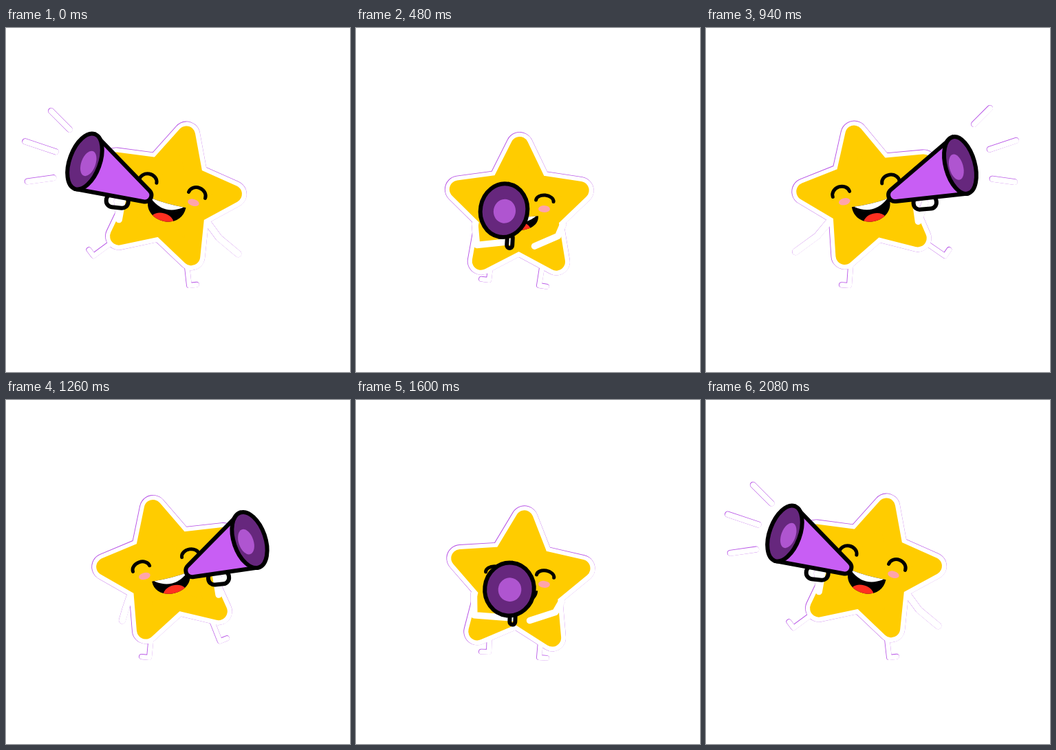
An HTML page with a canvas for the animation above (2120 ms loop, 500 px wide and 500 px high).

```html
<!DOCTYPE html>
<html lang="en">
<head>
<meta charset="utf-8">
<title>Star with megaphone</title>
<style>
  html, body { margin: 0; width: 100%; height: 100%; overflow: hidden; background: #fff; }
  canvas { display: block; width: 100vw; height: 100vh; }
</style>
</head>
<body>
<canvas id="stage" width="500" height="500"></canvas>
<script>
const ctx = document.getElementById('stage').getContext('2d');
const HALF = 1060, LOOP = 2 * HALF, STEP = 20, CX = 237, RAD = Math.PI / 180;
const YELLOW = '#ffcc00', FRINGE = '#b650e6', DARK = '#66277d', LIGHT = '#af55d0', BODY = '#c85ef4';
const SIDES = [-1, 1];

// y: height of the star, turn: its lean, bx and by: bell seen from the star, kick: lifted foot
const shout = { y: 245, turn: 15.7, bx: -122.5, by: -51, kick: 1 };
const lower = { y: 252, turn: 14, bx: -95.5, by: -39, kick: 0 };
const front = { y: 266, turn: 4.8, bx: -14, by: 9, kick: 0 };
const turn = { y: 252.6, turn: -8.6, bx: 75, by: -23.6, kick: .4 };
const reach = { y: 245, turn: -13.5, bx: 132.5, by: -45.5, kick: 1 };
const settle = { y: 248, turn: -14.5, bx: 117, by: -44.5, kick: .45 };

const mirror = p => ({ ...p, turn: -p.turn, bx: -p.bx });
const clamp = v => Math.max(0, Math.min(1, v));
const mix = (a, b, u) => [a[0] + (b[0] - a[0]) * u, a[1] + (b[1] - a[1]) * u];

// Swing from left to right; the way back is its mirror image
const keys = [
  [0, shout], [200, mirror(settle)], [320, lower], [540, mirror(front)],
  [620, turn], [780, reach], [940, reach], [1020, mirror(shout)]
];

function keyAt(i) {
  const n = keys.length, lap = Math.floor(i / n), [t, p] = keys[i - lap * n];
  return { t: t + lap * HALF, p: lap % 2 ? mirror(p) : p };
}

// Smooth interpolation that never overshoots a key
function poseAt(time) {
  const t = time % HALF, pose = {};
  let i = keys.length - 1;
  while (keys[i][0] > t) i--;
  const [a, b, c, d] = [i - 1, i, i + 1, i + 2].map(keyAt);
  const h = c.t - b.t, u = (t - b.t) / h;
  const slope = (x, y) => x * y > 0 ? 2 * x * y / (x + y) : 0;
  for (const k in b.p) {
    const v = b.p[k], e = c.p[k] - v;
    const m0 = slope((v - a.p[k]) / (b.t - a.t), e / h) * h;
    const m1 = slope(e / h, (d.p[k] - c.p[k]) / (d.t - c.t)) * h;
    pose[k] = v + u * (m0 + u * (3 * e - 2 * m0 - m1 + u * (m0 + m1 - 2 * e)));
  }
  return time >= HALF ? mirror(pose) : pose;
}

function line(pts, closed) {
  const path = new Path2D();
  pts.forEach(p => path.lineTo(...p));
  if (closed) path.closePath();
  return path;
}

function stroke(path, width, color) {
  ctx.lineWidth = width;
  ctx.strokeStyle = color;
  ctx.stroke(path);
}

function fill(path, color) {
  ctx.fillStyle = color;
  ctx.fill(path);
}

function oval(x, y, rx, ry, tilt = 0, from = 0, to = 2 * Math.PI) {
  const path = new Path2D();
  path.ellipse(x, y, rx, ry, tilt, from, to);
  return path;
}

// Maps a point of the star's own frame onto the stage
function placer(p) {
  const c = Math.cos(p.turn * RAD), s = Math.sin(p.turn * RAD);
  return (x, y) => [CX + x * c - y * s, p.y + x * s + y * c];
}

function starPath(at) {
  const pts = [];
  for (let i = 0; i < 10; i++) {
    const a = (i * 36 - 90) * RAD, r = i % 2 ? 46.4 : 93;
    pts.push(at(r * Math.cos(a), r * Math.sin(a)));
  }
  return line(pts, true);
}

// The cone shortens and its bell opens as it swings towards the viewer
function hornAt(p, at) {
  const bell = [CX + p.bx, p.y + p.by];
  const tipX = .28 * p.bx, tip = at(tipX, 22 - .42 * Math.abs(tipX));
  const dx = tip[0] - bell[0], dy = tip[1] - bell[1];
  const len = Math.hypot(dx, dy), full = Math.min(1, len / 95);
  const depth = 38 - .16 * len;
  const slope = Math.atan2(dy, Math.abs(dx)) - 9 * RAD;
  const [gx, gy] = mix(bell, tip, .54);
  return {
    bell, tip, depth, tall: 48.5 - .28 * depth,
    axis: Math.atan2(dy, dx), tilt: Math.sign(dx) * slope * full,
    grip: [gx, gy + 37 - 6 * full], gripW: Math.max(4, .16 * len)
  };
}

function armPath(p, at, side, hold, grip) {
  const out = 15 + .36 * Math.abs(p.bx) + 60 * p.kick;
  const elbow = mix(at(side * (50 + .3 * out), 38), at(side * 61, 52), hold);
  return line([at(side * 64, 21), elbow, mix(at(side * out, 53), grip, hold)]);
}

function legPath(p, at, side, near) {
  const kick = p.kick * near, hip = at(side * 38, 55);
  const x = CX + side * (29 + 15 * near + 66 * kick), y = 374 - 8 * near - 35 * kick;
  const dx = x - hip[0], dy = y - hip[1], k = 11 * side / Math.hypot(dx, dy);
  return line([hip, [x, y], [x + dy * k, y - dx * k]]);
}

// Three rays fan out from a point inside the megaphone
function rayPaths(t) {
  const right = t >= 820 && t < 1100;
  const late = t < STEP ? t + LOOP : t;
  if (!right && late < 1880) return [];
  const age = late - (right ? 820 : 1880);
  const shift = right ? age * .15 - 11 : age * .1 - 24;
  const flip = right ? -1 : 1;
  return [0, 1, 2].map(i => {
    const a = (225 - 26.5 * i) * RAD, len = (i === 1 ? 47 : 38) * (right ? .86 : 1);
    const tail = 83 + shift + (right ? 4 : 0);
    return line([tail, tail + len * clamp(age / 100)].map(r =>
      [CX + flip * (r * Math.cos(a) - 86), 206 + r * Math.sin(a)]));
  });
}

function drawFace(p) {
  const open = Math.max(.8, 1 - .03 * (p.y - 245)), depth = 46 * open;
  ctx.save();
  ctx.translate(CX, p.y);
  ctx.rotate(p.turn * RAD);
  for (const side of SIDES) {
    const eye = oval(37 * side - .012 * p.bx, -13, 12.8, 25 - 14 * (2 - open),
      5 * side * RAD, Math.PI, 2 * Math.PI);
    stroke(eye, 5, '#000');
    fill(oval(36.5 * side, -1.2, 8.5, 5), '#ffa4ab');
  }
  const mouth = new Path2D(`M-28 9Q0 12 28 9C30 ${depth} -30 ${depth} -28 9Z`);
  fill(mouth, '#000');
  ctx.clip(mouth);
  fill(oval(0, 37 * open, 17, 11.5), '#ff3020');
  fill(new Path2D('M-25 6L25 6L24 10Q0 28 -24 10Z'), '#fff');
  ctx.restore();
}

function drawHorn({ bell, tip, depth, tall, axis, tilt, grip, gripW }) {
  ctx.save();
  ctx.translate(...grip);
  ctx.rotate(tilt * .3);
  const handle = new Path2D();
  handle.roundRect(-gripW, -9.5, 2 * gripW, 19, Math.min(gripW, 9));
  stroke(handle, 6, '#000');
  ctx.restore();

  const ex = Math.sin(tilt) * tall, ey = -Math.cos(tilt) * tall;
  // Pick the bell end that lies on the same side as the start of the tip arc
  const side = Math.sin(axis) * ex - Math.cos(axis) * ey > 0 ? 1 : -1;
  const cone = new Path2D();
  cone.moveTo(bell[0] + ex * side, bell[1] + ey * side);
  cone.arc(...tip, 9.5, axis - 1.3, axis + 1.3);
  cone.lineTo(bell[0] - ex * side, bell[1] - ey * side);
  cone.closePath();
  fill(cone, BODY);
  stroke(cone, 6, '#000');

  const rim = oval(...bell, depth, tall, tilt);
  fill(rim, DARK);
  stroke(rim, 6, '#000');
  fill(oval(...mix(bell, tip, .06), depth * .47, tall * .45, tilt), LIGHT);
}

function draw(t) {
  const p = poseAt(t), at = placer(p), star = starPath(at), horn = hornAt(p, at);
  const near = SIDES.map(side => clamp(.5 + side * p.bx / 28));
  const arms = SIDES.map((side, i) => armPath(p, at, side, near[i], horn.grip));
  const soft = [
    [star, 39],
    ...SIDES.map((side, i) => [legPath(p, at, side, near[i]), 7]),
    ...arms.map(arm => [arm, 9]),
    ...rayPaths(t).map(ray => [ray, 8])
  ];

  ctx.fillStyle = '#fff';
  ctx.fillRect(0, 0, 500, 500);
  ctx.lineCap = ctx.lineJoin = 'round';
  for (const [path, w] of soft) stroke(path, w + .9, FRINGE);
  ctx.save();
  ctx.translate(.4, .4);
  for (const [path, w] of soft) stroke(path, w, '#fff');
  ctx.restore();

  fill(star, YELLOW);
  stroke(star, 26, YELLOW);
  drawFace(p);
  for (const arm of arms) stroke(arm, 9.5, '#fff');
  drawHorn(horn);
}

const start = performance.now();
function tick() {
  const t = (performance.now() - start) % LOOP;
  draw(Math.min(LOOP - 2 * STEP, Math.floor(t / STEP) * STEP));
  requestAnimationFrame(tick);
}
tick();
</script>
</body>
</html>
```
